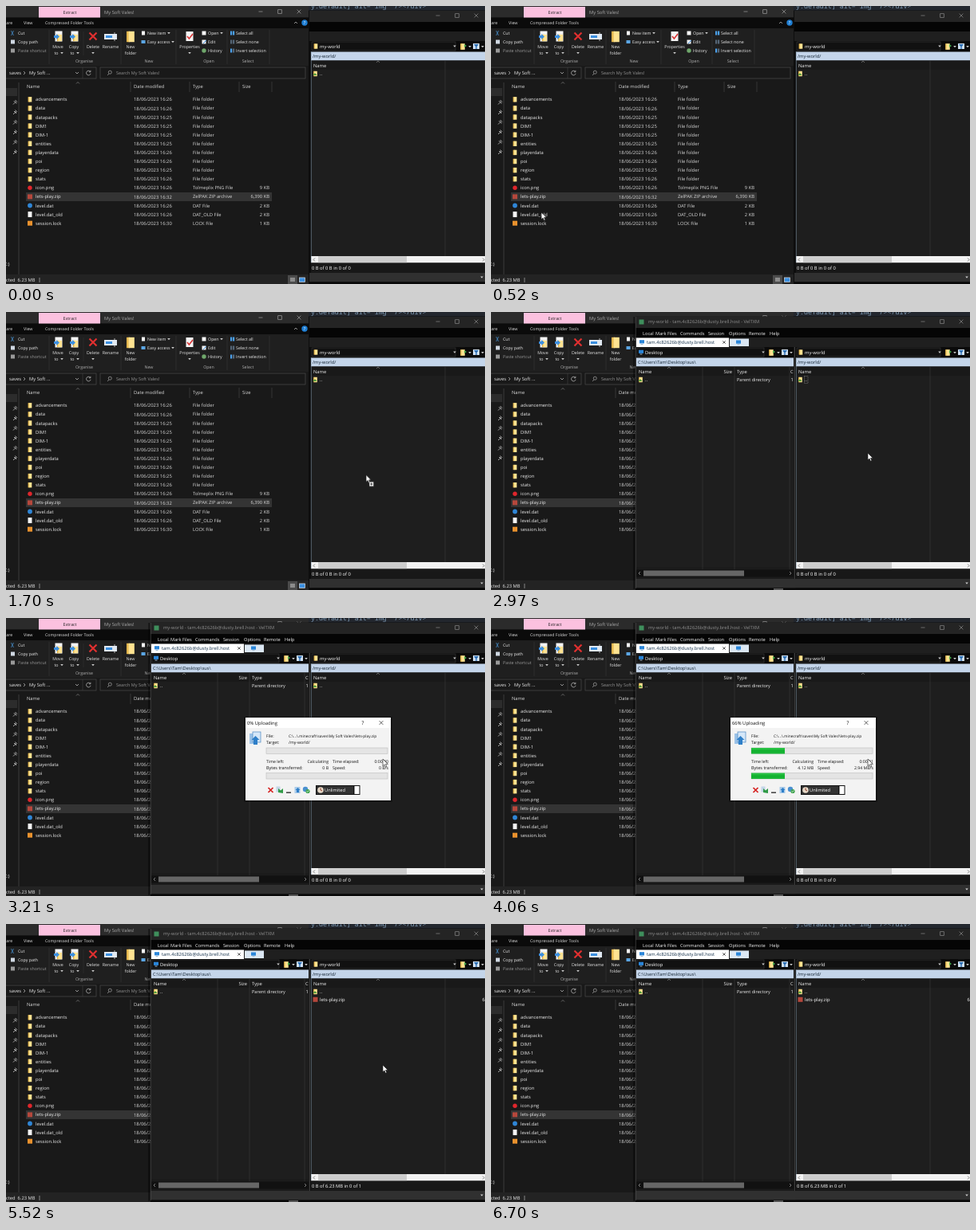
An HTML page for the animation above (6.76 s loop, 600x349 px).

```html
<!DOCTYPE html>
<html lang="en">
<head>
<meta charset="utf-8">
<title>Upload a world</title>
<style>
html, body { margin: 0; width: 100%; height: 100%; overflow: hidden; background: #000; }
svg { display: block; width: 600px; height: 349px; }
text { font-family: "Open Sans", "Noto Sans", sans-serif; white-space: pre; text-rendering: geometricPrecision; }
.code text { font-family: "Noto Sans Mono", "DejaVu Sans Mono", monospace; }
.anim { animation: 6760ms linear infinite; }
.step { animation: 6760ms step-end infinite; }

#front { animation-name: front; }
#focus { animation-name: focus; }
#before { animation-name: before; }
#after { animation-name: after; }
#dialog { animation-name: dialog; transform-origin: 391px 177px; }
#s0 { animation-name: s0; }
#s1 { animation-name: s1; }
#s2 { animation-name: s2; }
.bar { animation-name: fill; transform-box: fill-box; transform-origin: left; }
#cursor { animation-name: move; }
#ghost { animation-name: ghost; }
#badge { animation-name: badge; }

@keyframes front { 0% { visibility: hidden } 33.14%, 100% { visibility: visible } }
@keyframes focus { 0% { visibility: hidden } 33.14% { visibility: visible } 44.3%, 100% { visibility: hidden } }
@keyframes before { 0% { visibility: visible } 78.4%, 100% { visibility: hidden } }
@keyframes after { 0% { visibility: hidden } 78.4%, 100% { visibility: visible } }
@keyframes dialog {
  0%, 44.38% { opacity: 0; transform: scale(.93) }
  47.04%, 77.5% { opacity: 1; transform: none }
  78.4%, 100% { opacity: 0; transform: scale(.95) }
}
@keyframes s0 { 0% { visibility: visible } 56.95%, 100% { visibility: hidden } }
@keyframes s1 { 0% { visibility: hidden } 56.95% { visibility: visible } 74.85%, 100% { visibility: hidden } }
@keyframes s2 { 0% { visibility: hidden } 74.85%, 100% { visibility: visible } }
@keyframes fill {
  0%, 56.95% { transform: scaleX(0) }
  60.06% { transform: scaleX(.276) }
  64.5% { transform: scaleX(.62) }
  66.5%, 75.3% { transform: scaleX(.664) }
  77.5%, 100% { transform: scaleX(.87) }
}
@keyframes move {
  0%, .44% { transform: translate(104px, 354px); animation-timing-function: ease-in-out }
  10.36%, 15.68% { transform: translate(56px, 242.5px) }
  17.46% { transform: translate(77.4px, 243.3px) }
  20.7% { transform: translate(210px, 258px) }
  23.2% { transform: translate(380px, 246px) }
  25.15% { transform: translate(451px, 204.5px) }
  26.04% { transform: translate(455px, 202px); animation-timing-function: ease-out }
  30.03%, 87.87% { transform: translate(472px, 177px); animation-timing-function: ease-in-out }
  93.64%, 100% { transform: translate(104px, 354px) }
}
@keyframes ghost { 0% { visibility: hidden } 15.9% { visibility: visible } 23.2%, 100% { visibility: hidden } }
@keyframes badge { 0% { visibility: hidden } 23.2% { visibility: visible } 30.03%, 100% { visibility: hidden } }
</style>
</head>
<body>
<svg id="stage" viewBox="0 0 600 349" xmlns="http://www.w3.org/2000/svg"></svg>
<script>
const WORLD = "My Soft Vales!";
const SITE = "tam.4c82626b@dusty.brell.host";

// y is the vertical middle of the line
const text = (x, y, s, fill = "#ececec", size = 5.8, anchor = "start") =>
  `<text x="${x}" y="${y + size * .36}" font-size="${size}" fill="${fill}" text-anchor="${anchor}">${s.replace(/</g, "&lt;")}</text>`;
const rect = (x, y, w, h, fill, extra = "") =>
  `<rect x="${x}" y="${y}" width="${w}" height="${h}" fill="${fill}" ${extra}/>`;
const line = (d, stroke, w = .7) => `<path d="${d}" fill="none" stroke="${stroke}" stroke-width="${w}"/>`;
const shape = (d, fill) => `<path d="${d}" fill="${fill}"/>`;
const dot = (x, y, r, fill) => `<circle cx="${x}" cy="${y}" r="${r}" fill="${fill}"/>`;
const group = (id, kind, body) => `<g id="${id}" class="${kind}">${body}</g>`;
const vline = (x, y1, y2, c) => line(`M${x} ${y1}V${y2}`, c, .6);
const arrow = (x, y, c = "#ccc") => shape(`M${x - 1.8} ${y - 1}h3.6l-1.8 2.2z`, c);
const cross = (x, y, r, c, w = .8) => line(`M${x - r} ${y - r}l${2 * r} ${2 * r}m0 ${-2 * r}l${-2 * r} ${2 * r}`, c, w);
const folder = (x, y, k = 1) =>
  `<g transform="translate(${x} ${y}) scale(${k})">${rect(-2.4, -3.2, 2, 6.4, "#e3b64e")}${rect(-1.2, -3.2, 3.5, 6.4, "#ffe391")}</g>`;
const page = (x, y, w, h, fill = "#f4f4f4") => rect(x - w / 2, y - h / 2, w, h, fill);
const controls = (y, c, xs) =>
  line(`M${xs[0] - 2.5} ${y}h5`, c) + rect(xs[1] - 2.3, y - 2.3, 4.6, 4.6, "none", `stroke="${c}" stroke-width=".7"`) + cross(xs[2], y, 2.4, c, .7);

function ribbon() {
  const small = (x, y, s, c) => text(x, y, s, c, 5.3);
  const mid = (x, y, s, c = "#e4e4e4") => text(x, y, s, c, 5.3, "middle");
  const big = [[65, "Move", "to"], [85, "Copy", "to"], [109, "Delete", ""], [131, "Rename", ""], [156, "New", "folder"], [230, "Properties", ""]];
  let s = rect(0, 28, 379, 47, "#1f1f1f");
  s += line("M6.5 31l3 6m0-6l-3 6", "#4b9be0") + page(8.5, 45, 5, 5, "#cfd8e2") + page(8.5, 56, 5, 5, "#999");
  s += small(15, 34, "Cut") + small(15, 45, "Copy path") + small(15, 56, "Paste shortcut", "#9a9a9a");
  for (const [x, a, b] of big) {
    s += mid(x, 51, a) + (b ? mid(x - (b === "to" ? 2 : 0), 59, b) : "");
    if (b === "to") s += arrow(x + 5, 59) + page(x + 1, 38, 9, 13) + folder(x + 2, 40, 1.3) + shape(`M${x - 5} 37h3v-2l4 3.5-4 3.5v-2h-3z`, "#3b8fe0");
  }
  s += cross(109, 38, 4.5, "#e03030", 2.2) + arrow(109, 59) + arrow(230, 59);
  s += rect(123, 35, 16, 7, "#dfe8f2") + rect(125, 37, 8, 3, "#3b8fe0") + line("M136 33v11", "#eee");
  s += folder(156, 38.5, 2.1) + page(230, 38, 9, 12) + line("M227 38l2.4 3 4.6-6", "#d83434", 1.6);
  s += page(172, 34, 4, 5) + small(177, 34, "New item") + arrow(204, 34) + page(172, 45, 5, 4, "#5ba6e4") + small(177, 45, "Easy access") + arrow(209, 45);
  s += page(248, 34, 5, 5) + small(253, 34, "Open") + arrow(270, 34) + page(248, 45, 5, 5) + line("M247 47l4-4", "#3b8fe0", 1) + small(253, 45, "Edit") + dot(248, 56, 2.7, "#6fa76b") + small(253, 56, "History");
  ["Select all", "Select none", "Invert selection"].forEach((t, i) => {
    const y = 34 + 11 * i;
    s += rect(281, y - 2.5, 2.2, 5, i === 1 ? "#567" : "#4ba0ea") + rect(284, y - 2.5, 2.2, 5, i ? "#567" : "#4ba0ea") + small(288, y, t);
  });
  [[98, "Organise"], [179, "New"], [254, "Open"], [303, "Select"]].forEach(([x, t]) => s += mid(x, 69, t, "#b0b0b0"));
  [54, 144, 213, 277, 330].forEach(x => s += vline(x, 30, 73, "#3b3b3b"));
  return s + vline(97, 32, 62, "#333");
}

function explorer() {
  const rows = [
    ["advancements", 26], ["data", 26], ["datapacks", 25], ["DIM1", 25], ["DIM-1", 25], ["entities", 25],
    ["playerdata", 26], ["poi", 26], ["region", 25], ["stats", 26],
    ["icon.png", 26, "Tolmeplix PNG File", "9 KB"], ["lets-play.zip", 32, "ZelPAK ZIP archive", "6,390 KB"],
    ["level.dat", 26, "DAT File", "2 KB"], ["level.dat_old", 26, "DAT_OLD File", "2 KB"], ["session.lock", 30, "LOCK File", "1 KB"]
  ];
  const icons = {
    10: (x, y) => dot(x, y, 2.7, "#e0262c"),
    11: (x, y) => page(x, y, 6, 6, "#b5473c"),
    12: (x, y) => dot(x, y, 2.9, "#2f86d6"),
    13: (x, y) => page(x, y, 5, 7),
    14: (x, y) => page(x, y, 6, 6, "#e8912d")
  };
  let s = rect(0, 0, 379, 349, "#191919") + rect(0, 0, 379, 14.5, "#2b2b2b") + rect(0, 14.5, 379, 13.5, "#0b0b0b");
  s += rect(41, 1, 77, 13.5, "#fbc1df") + text(80, 8.5, "Extract", "#222", 5.3, "middle") + text(123, 7.5, WORLD, "#aaa");
  s += text(-3, 21, "hare", "#ddd", 5.3) + text(22, 21, "View", "#ddd", 5.3) + text(49, 21, "Compressed Folder Tools", "#ddd", 5.2);
  s += controls(7, "#a0a0a0", [319, 343, 367]) + line("M361 22l2-2 2 2", "#ccc") + dot(374, 21, 3.7, "#1f7fd4") + text(374, 21, "?", "#fff", 5.5, "middle");
  s += ribbon();
  s += rect(-2, 77, 115, 14, "#191919", 'stroke="#4a4a4a" stroke-width=".7"') + rect(118, 77, 257, 14, "#191919", 'stroke="#4a4a4a" stroke-width=".7"');
  s += text(4, 84, "saves") + line("M22 82l2 2-2 2", "#ccc") + text(29, 84, "My Soft ...") + line("M87 83l2 2 2-2", "#ccc");
  s += line("M105.5 82.2a2.8 2.8 0 1 0 .6 2.6m-.2-4v2h-2", "#ccc") + vline(96, 77, 91, "#444");
  s += line("M127 87l2-2", "#aaa") + `<circle cx="130.3" cy="83.2" r="2" fill="none" stroke="#aaa" stroke-width=".7"/>` + text(138, 84, "Search " + WORLD, "#949494", 5.5);
  // navigation pane
  s += rect(0, 103, 14, 10, "#2c2c2c") + rect(15, 96, 2, 241, "#2a2a2a");
  [121, 133.5, 146, 158.5, 171, 183.5].forEach(y => s += line(`M9 ${y + 2.5}l2-2m-1-2l3 3m-1.5-4.5l2.4 2.4m-2.9-.9l2 2`, "#bbb", .9));
  s += text(-2.5, 324, "C:)");
  s += line("M88 97.5l2-2 2 2", "#888") + [[26, "Name"], [160, "Date modified"], [234, "Type"], [296, "Size"]].map(([x, t]) => text(x, 101, t, "#d8d8d8")).join("");
  [156, 230, 292, 333].forEach(x => s += vline(x, 95, 108, "#4a4a4a"));
  s += rect(25, 234, 308, 11, "#343434");
  rows.forEach(([name, min, type = "File folder", size = ""], i) => {
    const y = 117.3 + 11.1 * i;
    s += (icons[i] || folder)(30, y) + text(37, y, name) + text(160, y, `18/06/2023 16:${min}`, "#d8d8d8", 5.9);
    s += text(234, y, type, "#d8d8d8") + text(330, y, size, "#d8d8d8", 5.8, "end");
  });
  s += rect(0, 337, 379, 12, "#232323") + text(0, 344, "cted  6.23 MB") + vline(42, 341, 347, "#ccc");
  s += rect(353, 338, 12, 11, "#4b4b4b") + line("M357 341v5m2-5v5m2-5v5", "#ddd", .9) + rect(367.5, 341, 7, 5.5, "#3b8fe0", 'stroke="#ddd" stroke-width=".7"');
  return s;
}

// shared chrome of one file panel from x1 to x2, sorted by its first column
function panel(x1, x2, name, path, icon, sortX) {
  let s = rect(x1, 44, x2 - x1, 13, "#0a0a0a") + rect(x1 + 1, 45, x2 - x1 - 38, 11, "#111", 'stroke="#3d3d3d" stroke-width=".6"');
  s += icon(x1 + 6, 50.5) + text(x1 + 11, 50.5, name, "#fff") + arrow(x2 - 38, 50.5);
  s += folder(x2 - 28, 51, 1.2) + shape(`M${x2 - 26} 48l3 2-3 2z`, "#4caf50") + arrow(x2 - 19, 51);
  s += rect(x2 - 15, 47, 8, 7, "#cfe0f2") + shape(`M${x2 - 14} 48h6l-2.3 3v3h-1.4v-3z`, "#2c6fb5") + arrow(x2 - 3, 51);
  s += rect(x1, 57.5, x2 - x1, 11, "#c4d5ea") + text(x1 + 2, 62.8, path, "#10202e", 5.7);
  s += rect(x1, 68.5, x2 - x1, 11.5, "#191919") + rect(x1, 80, x2 - x1, 240, "#1e1e1e") + text(x1 + 3, 74.5, "Name", "#eee");
  return s + line(`M${sortX - 2} 71l2-2 2 2`, "#888") + folder(x1 + 5.5, 85) + shape(`M${x1 + 5} 84l2.5 3h-5z`, "#4c9a3a") + text(x1 + 11, 85, "..", "#fff");
}

function winRight() {
  let s = rect(379, 0, 221, 6, "#23272e") + `<g class="code">${text(382, .4, "y.default] alt='img' /></div>", "#7f9bb5", 8.3)}</g>`;
  s += rect(379, 5.5, 221, 343.5, "#0d0d0d") + rect(380, 6, 220, 14, "#242424") + rect(380, 20, 220, 12, "#050505") + rect(380, 32, 220, 12, "#1f1f1f");
  s += controls(12, "#8c8c8c", [541, 565, 589]);
  s += panel(382, 600, "my-world", "/my-world/", folder, 466) + vline(550, 69, 314, "#3c3c3c");
  s += rect(382, 314, 218, 8.5, "#f2f2f2") + rect(391, 314, 111, 8.5, "#cdcdcd") + line("M387 316.5l-2 2 2 2m210-4l2 2-2 2", "#555");
  s += rect(382, 322.5, 218, 12.5, "#181818") + rect(380, 335, 220, 11.5, "#303030") + arrow(596, 340.5) + rect(380, 346.5, 220, 2.5, "#080808");
  s += vline(382.3, 57, 322, "#8497ab");
  s += group("before", "step", text(383, 329.3, "0 B of 0 B in 0 of 0", "#fff"));
  s += group("after", "step", text(383, 329.3, "0 B of 6.23 MB in 0 of 1", "#fff") + page(387.5, 94.8, 6, 6, "#b5473c") + text(393, 94.8, "lets-play.zip", "#fff") + text(596.5, 94.8, "6", "#fff"));
  return s;
}

function winLeft() {
  const menu = [[190, "Local"], [206, "Mark"], [221, "Files"], [237, "Commands"], [272, "Session"], [298, "Options"], [323, "Remote"], [349, "Help"]];
  const monitor = (x, y) => rect(x - 3, y - 2.8, 6, 4.2, "#2b86d9") + rect(x - 1.5, y + 2, 3, 1, "#9db8d0");
  let s = rect(178, 6, 3, 342, "#000", 'opacity=".4"') + rect(181, 5.5, 200, 343.5, "#1b1b1b") + rect(181, 6, 201, 14, "#242424");
  s += page(188.5, 12.5, 6, 6, "#3f8f5c") + text(197, 12, `my-world - ${SITE} - VelTXM`, "#8f8f8f", 5.75);
  s += rect(181, 20, 201, 12, "#050505") + rect(181, 32, 201, 12, "#1f1f1f") + menu.map(([x, t]) => text(x, 26.5, t, "#f2f2f2", 5.7)).join("");
  s += rect(182, 32.5, 116, 11.5, "#fff") + monitor(189, 38) + text(195, 38, SITE, "#16324c", 5.8) + cross(292, 38, 1.7, "#333", .8);
  s += rect(299, 33.5, 24, 9.5, "#dbe7f3") + monitor(310, 38.3);
  s += panel(182, 379, "Desktop", "C:\\Users\\Tam\\Desktop\\sus\\", monitor, 223);
  s += text(302, 74.5, "Size", "#eee", 5.8, "end") + text(308, 74.5, "Type", "#eee") + text(375, 74.5, "C", "#eee") + text(308, 85, "Parent directory", "#eee", 5.6) + text(375.5, 85, "1", "#eee");
  [265, 305, 374].forEach(x => s += vline(x, 69, 323, "#3c3c3c"));
  s += rect(182, 323.5, 197, 9, "#111") + rect(191, 324.5, 126, 7, "#666") + line("M187 326l-2 2 2 2m187-4l2 2-2 2", "#aaa");
  s += rect(181, 335, 201, 11.5, "#303030") + rect(181, 346.5, 201, 2.5, "#080808") + rect(354, 347, 12, 2, "#555");
  return s + vline(181.3, 6, 347, "#555") + vline(380.5, 44, 335, "#555");
}

function dialog() {
  const dark = (x, y, s, anchor, size = 5.2) => text(x, y, s, "#111", size, anchor);
  const meter = y => rect(326, y, 152, 7.5, "#e4e4e4", 'stroke="#b5b5b5" stroke-width=".5"') + `<rect class="anim bar" x="326" y="${y}" width="152" height="7.5" fill="url(#green)"/>`;
  const state = (id, pct, time, bytes, speed) => group(id, "step",
    dark(302, 131.5, `${pct}% Uploading`, "start", 5.9) + dark(479, 180, time, "end") + dark(404, 188, bytes, "end") + dark(479, 188, speed, "end"));
  let s = rect(298, 124, 186, 107, "#000", 'opacity=".3"') + rect(300, 125, 182, 104, "#f3f3f3") + rect(300, 125, 182, 13, "#fff");
  s += dark(447, 131.5, "?", "middle", 6.5) + cross(470, 131.5, 2.4, "#222", .7);
  s += rect(305, 145, 10, 13, "#9cc3e8") + rect(309, 143, 10, 13, "#d5e7f8", 'stroke="#4a86c0" stroke-width=".7"') + shape("M310 159v-6h-2.5l5-5 5 5H315v6z", "#2f7fc8");
  s += dark(326, 148, "File:") + dark(354, 148, `C:\\...\\.minecraft\\saves\\${WORLD}\\lets-play.zip`, "start", 4.85);
  s += dark(326, 156, "Target:") + dark(354, 156, "/my-world/") + meter(163);
  s += dark(326, 180, "Time left:") + dark(404, 180, "Calculating", "end") + dark(409, 180, "Time elapsed:");
  s += dark(326, 188, "Bytes transferred:", "start", 5.5) + dark(409, 188, "Speed:") + meter(194.5);
  s += state("s0", 0, "0:00:00", "0 B", "0 B/s") + state("s1", 66, "0:00:01", "4.12 MB", "2.94 MB/s") + state("s2", 100, "0:00:02", "6.23 MB", "2.46 MB/s");
  s += cross(331.5, 216, 3, "#d5201f", 1.7) + page(341, 215, 5, 7, "#c3d6e8") + shape("M341 219v-5l3 2.5 3-2.5v6z", "#2f9a46") + rect(351, 218.5, 6, 1.3, "#222");
  s += page(365, 216, 7, 8, "#a9cbea") + shape("M364 219v-3h-1.5l3-3 3 3H367v3z", "#2f7fc8") + dot(375, 215, 3.2, "#4a90d0") + dot(378, 217.5, 2.6, "#3fa34d") + line("M376.6 217.5l1 1 1.6-2", "#fff", .7);
  s += rect(388, 210, 55.5, 12, "#111") + rect(389, 211, 46, 10, "#333") + dot(394, 216, 3.8, "#e6d9c8") + line("M394 213.5v2.5l2 1", "#8a3020", .9) + text(399, 216, "Unlimited", "#fff", 5.7);
  return s + rect(436.5, 211, 6, 10, "#fff");
}

function cursor() {
  const ghost = rect(-30, -48.5, 52.5, 52, "#8fa3b5", 'opacity=".45" stroke="#c8d2da" stroke-width=".6"') + rect(-27, -44, 47, 44, "#9a4a40", 'opacity=".9"');
  const badge = rect(4, 8.8, 5.5, 5.5, "#fff", 'stroke="#222" stroke-width=".5"') + line("M6.75 10v3.1m-1.55-1.55h3.1", "#111", .8);
  return group("ghost", "step", ghost)
    + `<path d="M0 0V8.8L2 7l1.4 3.2 1.5-.7L3.5 6.4h2.8z" fill="#fff" stroke="#111" stroke-width=".6"/>`
    + group("badge", "step", badge);
}

document.getElementById("stage").innerHTML =
  `<defs><linearGradient id="green" x2="0" y2="1"><stop stop-color="#35c94f"/><stop offset=".5" stop-color="#10b02d"/><stop offset="1" stop-color="#1fb83b"/></linearGradient></defs>`
  + winRight() + explorer()
  + group("front", "step", winLeft())
  + group("focus", "step", rect(392.5, 80.5, 4.5, 9, "none", 'stroke="#bbb" stroke-width=".5" stroke-dasharray="1 1"'))
  + group("dialog", "anim", dialog())
  + group("cursor", "anim", cursor());
</script>
</body>
</html>
```
